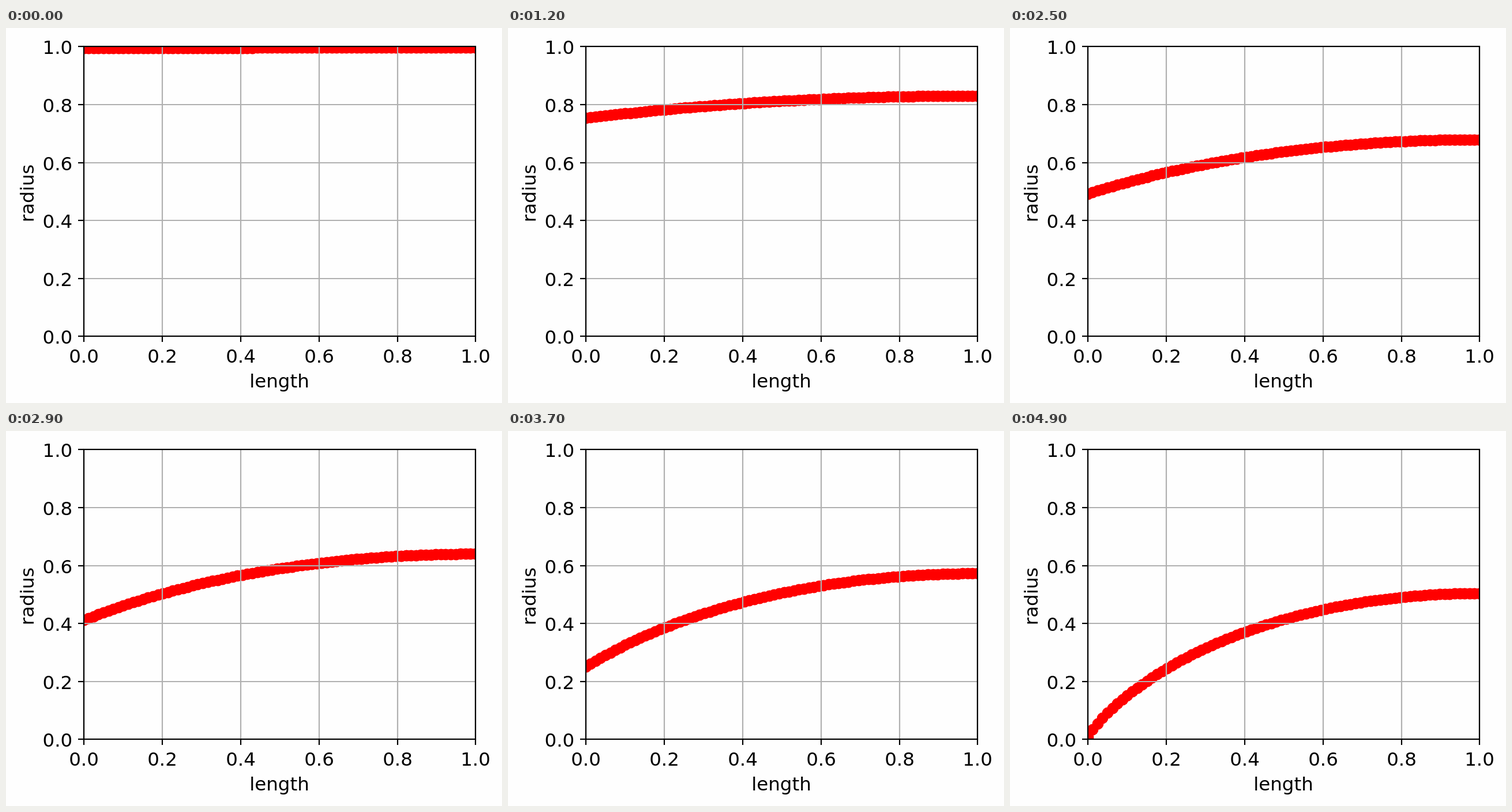
These frames come from a looping animation (860x651 px, 5 s). An HTML page with a canvas:

```html
<!DOCTYPE html>
<html lang="en">
<head>
<meta charset="utf-8">
<title>Radius over length</title>
<style>
html, body { margin: 0; width: 100%; height: 100%; overflow: hidden; background: #fefefe; }
canvas { display: block; }
</style>
</head>
<body>
<canvas id="stage" width="860" height="651"></canvas>
<script>
const ctx = document.getElementById('stage').getContext('2d');
const LEFT = 135, RIGHT = 814.4, TOP = 32.3, BOTTOM = 535.3;
const POINTS = 80, STEPS = 50, STEP_MS = 100;
const RATE = 0.69, FIRST = 0.0066, ADVANCE = 0.0201, SUBSTEPS = 20;
const DOT = 9.9, FONT = '32.5px "DejaVu Sans", sans-serif';

const px = x => LEFT + x * (RIGHT - LEFT);
const py = y => BOTTOM - y * (BOTTOM - TOP);

// Steady diffusion into a narrowing pore: r² c'' = k c, c(0) = 1, c'(1) = 0.
function concentration(r) {
  const n = r.length, h = 1 / (n - 1);
  const ratio = new Array(n).fill(0);
  for (let i = n - 1; i > 0; i--) {
    const sink = RATE * h * h / r[i] ** 2;
    ratio[i] = i === n - 1 ? 1 / (1 + sink / 2) : 1 / (2 + sink - ratio[i + 1]);
  }
  const c = [1];
  for (let i = 1; i < n; i++) c[i] = c[i - 1] * ratio[i];
  return c;
}

function narrow(r, amount) {
  const dt = amount / SUBSTEPS;
  for (let k = 0; k < SUBSTEPS; k++) {
    const c = concentration(r);
    r = r.map((v, i) => v - dt * c[i]);
  }
  return r;
}

const profiles = [narrow(new Array(POINTS).fill(1), FIRST)];
while (profiles.length < STEPS) profiles.push(narrow(profiles[profiles.length - 1], ADVANCE));

function line(x1, y1, x2, y2) {
  ctx.beginPath();
  ctx.moveTo(x1, y1);
  ctx.lineTo(x2, y2);
  ctx.stroke();
}

function drawDots(profile) {
  ctx.save();
  ctx.beginPath();
  ctx.rect(LEFT, TOP, RIGHT - LEFT, BOTTOM - TOP);
  ctx.clip();
  ctx.fillStyle = '#f00';
  profile.forEach((r, i) => {
    const x = Math.floor(px(i / (POINTS - 1))) + 0.5;
    const y = Math.floor(py(r)) + 0.5;
    ctx.beginPath();
    ctx.arc(x, y, DOT, 0, 2 * Math.PI);
    ctx.fill();
  });
  ctx.restore();
}

function drawAxes() {
  const left = Math.round(LEFT), right = Math.round(RIGHT);
  const top = Math.round(TOP), bottom = Math.round(BOTTOM);
  ctx.lineWidth = 2.2;
  ctx.font = FONT;
  ctx.fillStyle = '#000';
  ctx.textBaseline = 'alphabetic';
  for (let i = 0; i <= 5; i++) {
    const v = i / 5, x = Math.round(px(v)), y = Math.round(py(v));
    ctx.strokeStyle = '#b0b0b0';
    line(x, top, x, bottom);
    line(left, y, right, y);
    ctx.strokeStyle = '#000';
    line(x, bottom, x, bottom + 10);
    line(left - 10, y, left, y);
    ctx.textAlign = 'center';
    ctx.fillText(v.toFixed(1), x, 581);
    ctx.textAlign = 'right';
    ctx.fillText(v.toFixed(1), 115.3, y + 13);
  }
  ctx.strokeRect(left, top, right - left, bottom - top);

  ctx.textAlign = 'center';
  ctx.fillText('length', 474, 624);
  ctx.save();
  ctx.translate(48, 287);
  ctx.rotate(-Math.PI / 2);
  ctx.fillText('radius', 0, 0);
  ctx.restore();
}

function draw(now) {
  const step = Math.floor(now / STEP_MS) % STEPS;
  ctx.fillStyle = '#fefefe';
  ctx.fillRect(0, 0, 860, 651);
  drawDots(profiles[step]);
  drawAxes();
}

const start = performance.now();
function tick() {
  draw(performance.now() - start);
  requestAnimationFrame(tick);
}
tick();
</script>
</body>
</html>
```
